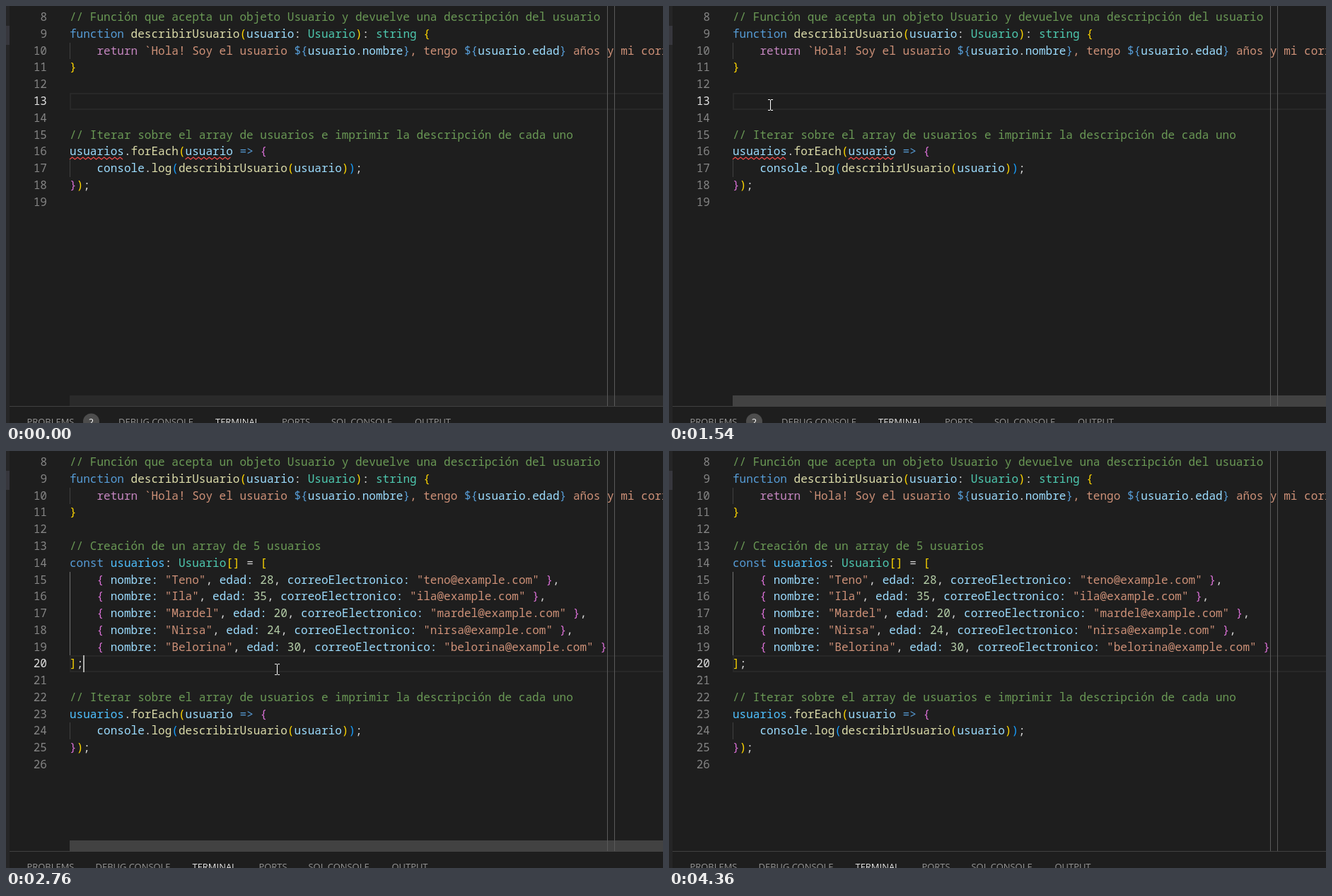
An HTML page for the animation above (4470 ms loop, 929 px wide and 590 px high).

```html
<!DOCTYPE html>
<html lang="es">
<head>
<meta charset="utf-8">
<title>Editor</title>
<style>
html, body { margin: 0; width: 100%; height: 100%; overflow: hidden; background: #1e1e1e; }
svg { display: block; width: 100%; height: 100%; }
text { white-space: pre; }
.code { font: 16.04px "Noto Sans Mono", "DejaVu Sans Mono", monospace; font-variant-ligatures: none; }
.tab { font: 12.95px "Open Sans", "Noto Sans", sans-serif; }
</style>
</head>
<body>
<svg id="stage" viewBox="0 0 929 590"></svg>
<script>
(() => {
const LOOP = 4470, LEFT = 90, CHAR = 9.624, PITCH = 23.77;
const COLORS = {
  c: '#6a9955', k: '#569cd6', f: '#dcdcaa', v: '#9cdcfe', t: '#4ec9b0', s: '#ce9178',
  r: '#c586c0', n: '#b5cea8', o: '#4fc1ff', w: '#d4d4d4', 1: '#ffd700', 2: '#da70d6', 3: '#179fff'
};
const stage = document.getElementById('stage');

function add(parent, tag, attrs, content) {
  const el = document.createElementNS(stage.namespaceURI, tag);
  for (const key in attrs) el.setAttribute(key, attrs[key]);
  if (content !== undefined) el.textContent = content;
  parent.appendChild(el);
  return el;
}
const group = parent => add(parent, 'g');
const rect = (parent, x, y, width, height, fill) => add(parent, 'rect', { x, y, width, height, fill });
const show = (el, on) => el.setAttribute('display', on ? 'inline' : 'none');
const rowTop = row => Math.round(123 + (row - 13) * PITCH);

// Each "~" starts a token; the character after it picks the colour.
function code(parent, row, source) {
  const line = add(parent, 'text', { class: 'code', x: LEFT, y: rowTop(row) + 17 });
  for (const part of source.split('~').slice(1)) {
    add(line, 'tspan', { fill: COLORS[part[0]] }, part.slice(1));
  }
}
function numbers(parent, from, to, active) {
  for (let row = from; row <= to; row++) {
    add(parent, 'text', {
      class: 'code', x: 58, y: rowTop(row) + 17, 'text-anchor': 'end',
      fill: row === active ? '#e0e0e0' : '#858585'
    }, row);
  }
}
function highlight(parent, row) {
  add(parent, 'rect', {
    x: LEFT + 1, y: rowTop(row) + 1, width: 900, height: 22,
    fill: 'none', stroke: '#282828', 'stroke-width': 2
  });
}
function guide(parent, row, rows, color) {
  rect(parent, LEFT, rowTop(row), 1, rowTop(row + rows) - rowTop(row), color);
}
function squiggle(parent, row, column, length) {
  const left = LEFT + column * CHAR, right = left + length * CHAR, y = rowTop(row) + 23;
  let d = `M${left} ${y}`;
  for (let x = left, i = 1; x + 3.75 <= right; i++) {
    x += 3.75;
    d += `L${x} ${y - (i % 2) * 3}`;
  }
  add(parent, 'path', { d, fill: 'none', stroke: '#f14c4c', 'stroke-width': 1.2 });
}
function loopCode(parent, row) {
  guide(parent, row + 2, 1, '#404040');
  code(parent, row, '~c// Iterar sobre el array de usuarios e imprimir la descripción de cada uno');
  code(parent, row + 2, '~v    console~w.~flog~3(~fdescribirUsuario~1(~vusuario~1)~3)~w;');
  code(parent, row + 3, '~2}~1)~w;');
}
function forEach(parent, row, color) {
  code(parent, row, `~${color}usuarios~w.~fforEach~1(~vusuario~k => ~2{`);
}
function errors(parent, row) {
  squiggle(parent, row, 0, 8);
  squiggle(parent, row, 17, 7);
}

// Frame of the editor
rect(stage, 0, 0, 929, 590, '#1e1e1e');
rect(stage, 0, 0, 5, 590, '#252526');
rect(stage, 0, 28, 5, 27, '#37373d');

// Rows that never change
numbers(stage, 8, 12);
guide(stage, 10, 1, '#404040');
code(stage, 8, '~c// Función que acepta un objeto Usuario y devuelve una descripción del usuario');
code(stage, 9, '~kfunction ~fdescribirUsuario~1(~vusuario~w: ~tUsuario~1)~w: ~tstring ~1{');
code(stage, 10, '~r    return ~s`Hola! Soy el usuario ~k${~vusuario~w.~vnombre~k}~s, tengo '
  + '~k${~vusuario~w.~vedad~k}~s años y mi correo');
code(stage, 11, '~1}');

// Before the paste
const before = group(stage);
highlight(before, 13);
numbers(before, 13, 19, 13);
loopCode(before, 15);
forEach(before, 16, 'v');
errors(before, 16);

// After the paste
const after = group(stage);
highlight(after, 20);
numbers(after, 13, 26, 20);
guide(after, 15, 5, '#707070');
code(after, 13, '~c// Creación de un array de 5 usuarios');
code(after, 14, '~kconst ~ousuarios~w: ~tUsuario~1[]~w = ~1[');
code(after, 20, '~1]~w;');
loopCode(after, 22);
const plain = group(after), colored = group(after);
const users = [['Teno', 28], ['Ila', 35], ['Mardel', 20], ['Nirsa', 24], ['Belorina', 30]];
users.forEach(([name, age], i) => {
  const mail = name.toLowerCase() + '@example.com', comma = i < 4 ? '~w,' : '';
  code(plain, 15 + i,
    `~2    { ~wnombre: "${name}", edad: ${age}, correoElectronico: "${mail}" ~2}${comma}`);
  code(colored, 15 + i, `~2    { ~vnombre: ~s"${name}"~w, ~vedad: ~n${age}~w, `
    + `~vcorreoElectronico: ~s"${mail}" ~2}${comma}`);
});
const unresolved = group(after), resolved = group(after);
forEach(unresolved, 23, 'v');
errors(unresolved, 23);
forEach(resolved, 23, 'o');

const caret = rect(stage, 0, 0, 2, 24, '#aeafad');
const scrollbar = rect(stage, LEFT, 551, 839, 15, '#424242');
rect(stage, 850, 0, 1, 566, '#5a5a5a');
rect(stage, 860, 0, 1, 566, '#5a5a5a');

// Panel tabs
rect(stage, 5, 566, 924, 1, '#414141');
function tab(parent, x, label) {
  const fill = label === 'TERMINAL' ? '#e7e7e7' : '#969696';
  add(parent, 'text', { class: 'tab', x, y: 592.5, fill }, label);
}
tab(stage, 29.5, 'PROBLEMS');
const badge = group(stage);
add(badge, 'circle', { cx: 120.5, cy: 588, r: 11.5, fill: '#4d4d4d' });
add(badge, 'text', { class: 'tab', x: 120.5, y: 592.5, fill: '#fff', 'text-anchor': 'middle' }, '2');
const tabs = group(stage);
[[159, 'DEBUG CONSOLE'], [296, 'TERMINAL'], [390, 'PORTS'], [460, 'SQL CONSOLE'], [578, 'OUTPUT']]
  .forEach(([x, label]) => tab(tabs, x, label));

// Mouse pointer
const mouse = group(stage);
const beam = add(mouse, 'path', {
  d: 'M-3 -7.5h3M1 -7.5h3M.5 -7v14M-3 7.5h3M1 7.5h3', stroke: '#fff', fill: 'none'
});
const arrow = add(mouse, 'path', {
  d: 'M.5 .5v16l3.7-3.6 2.4 5.6 2.3-1-2.4-5.4h5z', fill: '#fff', stroke: '#000'
});

const linear = p => p;
const easeOut = p => 1 - (1 - p) ** 2.5;
const easeInOut = p => p * p * (3 - 2 * p);
const route = [
  [50, 801, 552], [90, 644, 447], [110, 540, 379], [130, 444, 313], [150, 378, 264],
  [180, 353, 242], [210, 340, 231], [550, 158, 144, easeOut], [740, 158, 144],
  [790, 163, 145], [970, 143, 140], [2570, 143, 140], [3030, 785, 592, easeInOut]
];
function pointerAt(t) {
  const i = Math.max(1, route.findIndex(key => key[0] > t));
  const [t0, x0, y0] = route[i - 1], [t1, x1, y1, ease = linear] = route[i];
  const p = ease((t - t0) / (t1 - t0));
  return [Math.round(x0 + (x1 - x0) * p), Math.round(y0 + (y1 - y0) * p)];
}
function caretAlpha(t) {
  const on = [[890, 1390], [1650, 2130], [2630, 3200], [3870, 4360]];
  if (on.some(([from, to]) => t >= from && t < to)) return 1;
  return t >= 3200 && t < 3870 ? 0.25 : 0;
}
function scrollAlpha(t) {
  if (t < 50) return 0.36;
  if (t < 3200) return Math.min(1, 0.36 + (t - 50) / 100);
  return t < 3730 ? 0.77 : 0;
}

function render(t) {
  const pasted = t >= 1650, checked = t >= 2000;
  show(before, !pasted);
  show(after, pasted);
  show(plain, t < 1670);
  show(colored, t >= 1670);
  show(unresolved, !checked);
  show(resolved, checked);
  show(badge, !checked);
  tabs.setAttribute('transform', `translate(${checked ? -32.5 : 0} 0)`);

  caret.setAttribute('x', pasted ? 109 : LEFT);
  caret.setAttribute('y', rowTop(pasted ? 20 : 13));
  caret.setAttribute('opacity', caretAlpha(t));
  scrollbar.setAttribute('opacity', scrollAlpha(t));

  const moving = t >= 50 && t < 3030;
  show(mouse, moving);
  if (moving) {
    const [x, y] = pointerAt(t);
    mouse.setAttribute('transform', `translate(${x} ${y})`);
    show(arrow, y >= 551);
    show(beam, y < 551);
  }
}

const start = performance.now();
function tick() {
  render((performance.now() - start) % LOOP);
  requestAnimationFrame(tick);
}
tick();
})();
</script>
</body>
</html>
```
